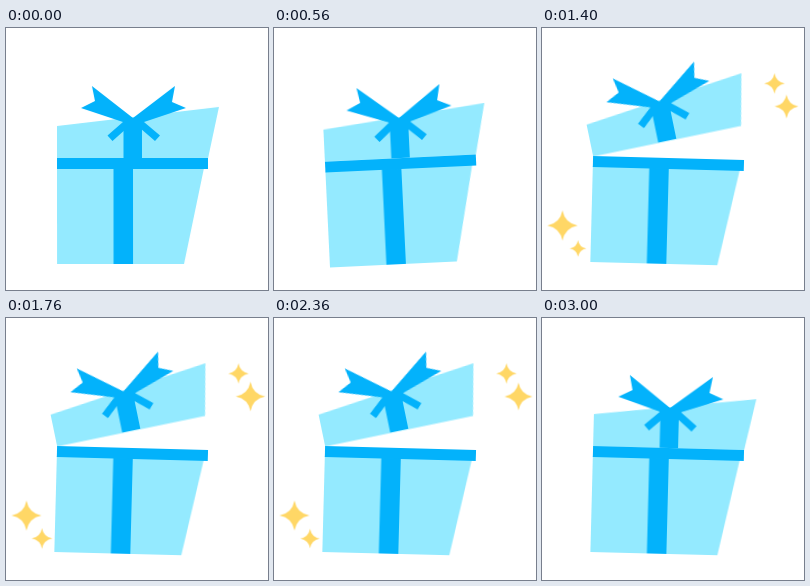
Animation, 262 px wide and 262 px high, one loop 3.04 s. Source, as an HTML page:

```html
<!DOCTYPE html>
<html lang="en">
<head>
<meta charset="utf-8">
<title>Gift box</title>
<style>
  html, body { margin: 0; width: 100%; height: 100%; overflow: hidden; background: #fff; }
  svg { display: block; width: 100%; height: 100%; }

  .paper { fill: #94eaff; }
  .ribbon { fill: #03b2fb; }
  .star { fill: #ffd766; }

  .gift, .lid, .lead, .lag { animation: 3040ms linear infinite; }
  .gift { transform-origin: 127px 133px; animation-name: wobble; }
  .lid { transform-origin: 51px 130px; animation-name: open; }
  .lead { animation-name: lead; }
  .lag { animation-name: lag; }

  @keyframes wobble {
    0%, 100% { transform: rotate(0deg); }
    3.95%, 16.94% { transform: rotate(-4deg); }
    10.53% { transform: rotate(1.5deg); }
    23.52%, 98.68% { transform: rotate(1.5deg); }
  }
  @keyframes open {
    0%, 23.03%, 97.37%, 100% { transform: rotate(0deg); }
    32.57%, 88.82% { transform: rotate(-13.2deg); }
  }
  /* Sparkles grow, pulse, then vanish together */
  @keyframes lead {
    0%, 23.68%, 97.04%, 100% { transform: scale(0); }
    47.37%, 61.18%, 74.67%, 88.16% { transform: scale(1); }
    54.28%, 67.93%, 81.41% { transform: scale(.86); }
  }
  @keyframes lag {
    0%, 23.68%, 97.04%, 100% { transform: scale(0); }
    53.95%, 68.42%, 88.16% { transform: scale(1); }
    61.18%, 78.29% { transform: scale(.86); }
  }
</style>
</head>
<body>
<svg viewBox="0 0 262 262">
  <defs>
    <path id="star" d="M0-16Q2.5-2.5 16 0Q2.5 2.5 0 16Q-2.5 2.5-16 0Q-2.5-2.5 0-16Z"/>
  </defs>

  <g class="gift">
    <path class="paper" d="M51 140H198L178 236H51Z"/>
    <path class="ribbon" d="M107.500 140H127V236H107.500Z"/>
    <g class="lid">
      <path class="paper" d="M51 98L213 79L202 130.500H51Z"/>
      <path class="ribbon" d="M117.500 92H136V130H117.500Z"/>
      <path class="ribbon" d="M127 90L86 58L89 73L75 80L117 94L101.500 107.500L106.500 113L121 100H134L149 113L154 107.500L138 94L180 80L166 74L169 58Z"/>
    </g>
    <path class="ribbon" d="M51 130H202V141H51Z"/>
  </g>

  <g class="star">
    <g transform="translate(20.500 197.500)"><use class="lead" href="#star"/></g>
    <g transform="translate(36 220.500) scale(.7)"><use class="lag" href="#star"/></g>
    <g transform="translate(244.500 78.500)"><use class="lag" href="#star"/></g>
    <g transform="translate(232.500 55.500) scale(.68)"><use class="lead" href="#star"/></g>
  </g>
</svg>
</body>
</html>
```
